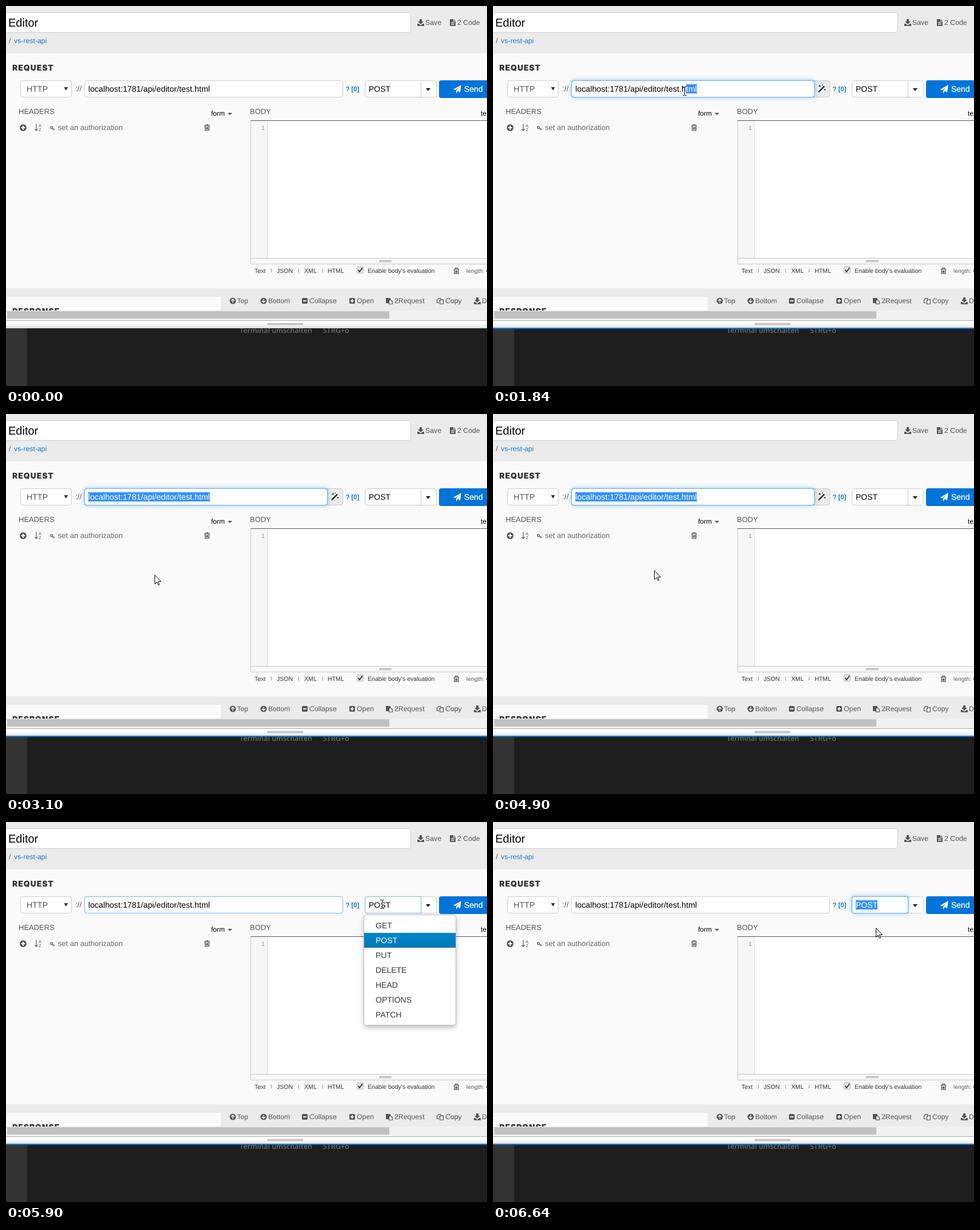
Write an HTML page that moves like this. It is 842x665 px and loops after 8 s.

```html
<!DOCTYPE html>
<html lang="en">
<head>
<meta charset="utf-8">
<title>REST editor</title>
<style>
  html, body { margin: 0; width: 100%; height: 100%; overflow: hidden; }
  svg { display: block; }
  text { font: 12.3px "Liberation Sans", Arial, sans-serif; fill: #555; text-rendering: geometricPrecision; white-space: pre; }
  .f13 { font-size: 13px; }
  .f14 { font-size: 14px; }
  .url { font-size: 14.3px; }
  .small { font-size: 10.6px; fill: #333; }
  .black { fill: #000; }
  .white { fill: #fff; }
  .link { fill: #1a79c9; }
  .title { font: 900 14px Inter, "Liberation Sans", sans-serif; letter-spacing: .9px; fill: #333; }
  .term { font: 600 12.5px "Open Sans", "Noto Sans", sans-serif; fill: #6c6c6c; }
  .field { fill: #fff; stroke: #ccc; }
  .ring { fill: none; stroke: #5cb3ee; }
  .glow { fill: #fff; stroke: #5cb3ee; filter: drop-shadow(0 0 3.5px rgba(82, 168, 236, .75)); }
  .sel { fill: #3390ff; }
  .icon { fill: #555; }
  .line { fill: none; stroke: #555; stroke-width: 1.2; }
  #menu .panel { fill: #fff; stroke: #bbb; filter: drop-shadow(0 4px 4px rgba(0, 0, 0, .25)); }
  #menu text { font-size: 14px; fill: #333; }
</style>
</head>
<body>
<svg width="842" height="665" viewBox="0 0 842 665">
  <defs>
    <g id="download"><path class="icon" d="M4 0h4v4h3L6 9 1 4h3zM0 8h2.5L6 11l3.500-3H12v4H0z"/></g>
    <g id="trash"><path class="line" d="M0 2.500H10M3 2V.6H7V2M1.500 3V10.400H8.500V3M3.500 4.500V9M5 4.500V9M6.500 4.500V9"/></g>
    <linearGradient id="active" x2="0" y2="1"><stop stop-color="#08c"/><stop offset="1" stop-color="#0077b3"/></linearGradient>
    <linearGradient id="bar" x2="0" y2="1"><stop offset=".4" stop-color="#fff"/><stop offset="1" stop-color="#ddd"/></linearGradient>
    <clipPath id="urlClip"><rect class="urlSel" y="137" height="16"/></clipPath>
    <clipPath id="respClip"><path d="M0 509H376V533H0z"/></clipPath>
  </defs>

  <!-- page -->
  <path fill="#fafafa" d="M0 0H842V550H0z"/>
  <path fill="#ebebeb" d="M0 0H842V83H0zM0 494H842V533H376V509H0z"/>
  <rect class="field" x="-5.500" y="11.500" width="714" height="35" rx="4"/>
  <text x="4" y="36" class="black" style="font-size:20px">Editor</text>
  <use href="#download" x="720" y="23"/>
  <text x="734" y="33">Save</text>
  <path class="icon" d="M777 23h6v4h4v8h-10zM784 23l3 3h-3z"/>
  <path stroke="#ebebeb" d="M779 28.500h6M779 30.500h6M779 32.500h6"/>
  <text x="790" y="33">2 Code</text>
  <text x="5" y="65">/</text>
  <text x="14" y="65" class="link">vs-rest-api</text>

  <!-- request line -->
  <text x="11" y="113" class="title">REQUEST</text>
  <rect class="field" x="25.500" y="130.500" width="89" height="29" rx="4"/>
  <text x="36" y="150" class="url">HTTP</text>
  <path fill="#333" d="M101.500 142h7l-3.500 6z"/>
  <text x="121.500" y="149" class="f13">://</text>
  <rect class="field" x="137.500" y="130.500" width="452" height="29" rx="4"/>
  <g id="wand">
    <path fill="#ebebeb" stroke="#ccc" d="M562.500 130.500h23a4 4 0 0 1 4 4v21a4 4 0 0 1-4 4h-23z"/>
    <path stroke="#222" stroke-width="2.400" d="M570 150.500l10-10"/>
    <path stroke="#222" d="M572 138v4M570 140h4M576.500 137v2M581 145v3M579.500 146.500h3"/>
  </g>
  <rect id="urlGlow" class="glow" x="137.500" y="130.500" height="29" rx="4"/>
  <rect id="urlRing" class="ring" x="137.500" y="130.500" height="29" rx="4"/>
  <text id="url" x="144" y="150" class="url black">localhost:1781/api/editor/test.html</text>
  <rect class="sel urlSel" y="137" height="16"/>
  <text x="144" y="150" class="url white" clip-path="url(#urlClip)">localhost:1781/api/editor/test.html</text>
  <text x="594.500" y="149" style="font-weight:bold;font-size:11.300px;fill:#0a74c0">? [0]</text>
  <rect class="field" x="628.500" y="130.500" width="125" height="29" rx="4"/>
  <path stroke="#ccc" d="M726.500 131V159"/>
  <path d="M735 144h8l-4 4.500z"/>
  <rect id="postGlow" class="glow" x="628.500" y="130.500" width="98" height="29" rx="3"/>
  <rect id="postRing" class="ring" x="628.500" y="130.500" width="98" height="29" rx="3"/>
  <rect id="postSel" class="sel" x="635" y="137" width="38" height="16"/>
  <text id="post" x="635" y="150" class="f14 black">POST</text>
  <rect x="758" y="130" width="94" height="31" rx="4" fill="#0074d9"/>
  <path class="white" fill="#fff" d="M797 138l-2 13-4.500-2-2.500 4v-5l6-7-7.500 6.500-3.500-1.500z"/>
  <text x="802" y="150" class="f14 white" stroke="#fff" stroke-width=".3">Send</text>

  <!-- headers -->
  <text x="22" y="189" class="f13">HEADERS</text>
  <text x="359" y="192" class="black" style="font-size:12px">form</text>
  <path class="icon" d="M388 187h8l-4 4z"/>
  <circle class="icon" cx="30" cy="213" r="6"/>
  <path stroke="#fafafa" stroke-width="2" d="M26.500 213h7M30 209.500v7"/>
  <path class="line" d="M53 206.500v11.500M50.500 215.500l2.500 2.500 2.500-2.500"/>
  <text x="57" y="212" style="font-size:7.500px">A</text>
  <text x="57" y="219" style="font-size:7.500px">Z</text>
  <circle class="line" cx="79.500" cy="212.500" r="1.900"/>
  <path class="line" d="M81 213.500l4.500 3.500M83 215l-1 1.500"/>
  <text x="91" y="217" class="f13" style="fill:#666">set an authorization</text>
  <use href="#trash" x="347" y="207"/>

  <!-- body -->
  <text x="427" y="189" class="f13">BODY</text>
  <text x="831" y="192" class="black" style="font-size:12px">text</text>
  <path fill="#fff" d="M458 201H842V441H458z"/>
  <path fill="#f7f7f7" d="M429 201H457V441H429z"/>
  <path stroke="#ddd" d="M457.500 201V441"/>
  <path stroke="#c4c4c4" fill="none" d="M842 451.500H428.500V200M429 441.500H842"/>
  <path stroke="#555" d="M428 200.500H842"/>
  <path stroke="#999" d="M653 445.500h22M653 447.500h22"/>
  <text x="447" y="217" style="font-size:11px;fill:#999">1</text>
  <text x="435" y="467" class="small">Text</text>
  <text x="474" y="467" class="small">JSON</text>
  <text x="522" y="467" class="small">XML</text>
  <text x="563" y="467" class="small">HTML</text>
  <path stroke="#5b9fc9" d="M464.500 459.500v7M512.500 459.500v7M553.500 459.500v7"/>
  <rect x="614.500" y="456.500" width="11" height="11" rx="1.500" fill="#f4f4f4" stroke="#aaa"/>
  <path d="M616.500 462l2.500 3 5-7" fill="none" stroke="#333" stroke-width="2"/>
  <text x="633" y="467" class="small">Enable body's evaluation</text>
  <use href="#trash" x="783.500" y="458"/>
  <text x="806" y="467" style="font-size:10px;letter-spacing:.2px">length: 0</text>

  <!-- response bar -->
  <text x="11" y="539" class="title" clip-path="url(#respClip)">RESPONSE</text>
  <circle class="icon" cx="397" cy="516" r="5.500"/>
  <path fill="none" stroke="#ebebeb" stroke-width="1.500" d="M394 516l3-3 3 3M397 513v6.500"/>
  <text x="404.500" y="520" style="font-size:12px">Top</text>
  <circle class="icon" cx="451" cy="516" r="5.500"/>
  <path fill="none" stroke="#ebebeb" stroke-width="1.500" d="M448 516l3 3 3-3M451 519v-6.500"/>
  <text x="459" y="520" style="font-size:12px">Bottom</text>
  <rect class="icon" x="518" y="511" width="10" height="10" rx="2"/>
  <path stroke="#ebebeb" stroke-width="2" d="M520 516h6"/>
  <text x="531" y="520">Collapse</text>
  <rect class="icon" x="601" y="511" width="10" height="10" rx="2"/>
  <path stroke="#ebebeb" stroke-width="2" d="M603 516h6M606 513v6"/>
  <text x="614" y="520">Open</text>
  <path class="icon" d="M665 511h8v3h-3v6h-5z"/>
  <path class="line" d="M670.500 514.500h3.500l2.500 2.500v4.500h-6z"/>
  <text x="680" y="520">2Request</text>
  <path class="line" d="M758 519.500h-3.500v-5l3-3h3.500v2.500M759.500 514.500h3l3-1v8h-6z"/>
  <text x="769" y="520">Copy</text>
  <use href="#download" x="819" y="510"/>
  <text x="833" y="520">Download</text>

  <!-- scrollbar, terminal, splitter -->
  <path fill="#f1f1f1" d="M0 533H842V550H0z"/>
  <path fill="#c1c1c1" d="M2 534H671V547H2z"/>
  <path fill="#1e1e1e" d="M0 564H842V665H0z"/>
  <path fill="#333" d="M0 564H37V665H0z"/>
  <text x="409" y="572" class="term">Terminal umschalten</text>
  <text x="555" y="572" class="term">STRG+o</text>
  <path fill="url(#bar)" d="M0 550H842V564H0z"/>
  <path stroke="#aaa" d="M0 550.500H842"/>
  <path fill="#fff" stroke="#999" d="M458.500 555.500h61v2h-61z"/>
  <path id="edge" stroke="#0e80d8" stroke-width="2" d="M0 564H842"/>

  <g id="menu">
    <rect class="panel" x="626.500" y="162.500" width="161" height="193" rx="5"/>
    <path fill="url(#active)" d="M627 194h160v26h-160z"/>
  </g>

  <path id="arrow" fill="#fff" stroke="#000" d="M.5.8V16.500l3.700-3.500 2.500 5.500 2-.9-2.400-5.200H11.300z"/>
  <g id="beam" fill="none">
    <path stroke="#fff" stroke-width="2.500" d="M0-6V6"/>
    <path stroke="#000" d="M-3.500-7.500H-1Q0-7.500 0-6.500Q0-7.500 1-7.500H3.500M0-6.500V6.500M-3.500 7.500H-1Q0 7.500 0 6.500Q0 7.500 1 7.500H3.500"/>
  </g>
</svg>
<script>
const LOOP = 8000, START = 499, TICK = 200 / 3;
const FOCUS = 18, DRAG_END = 28, RELEASE = 32, SWITCH = 80;
const URL_X = 144;
const $ = id => document.getElementById(id);
const clamp = v => Math.max(0, Math.min(1, v));

// pointer hotspot: tick, x, y
const path = [
  [0, 712, 184], [2, 520, 160], [5, 352, 147], [7, 352, 147],
  [8, 359, 148], [9, 365, 149], [10, 365, 149], [13, 374, 149],
  [18, 374, 149], [19, 366, 149], [26, 152, 148], [28, 123, 148],
  [31, 123, 148], [32, 200, 149], [35, 543, 168], [36, 440, 215],
  [37, 360, 250], [39, 260, 281], [65, 260, 281], [66, 282, 273],
  [70, 430, 222], [73, 670, 166], [75, 658, 143.5], [86, 658, 143.5],
  [87, 658, 150], [92, 670, 185]
];

["GET", "POST", "PUT", "DELETE", "HEAD", "OPTIONS", "PATCH"].forEach((name, i) => {
  const item = document.createElementNS("http://www.w3.org/2000/svg", "text");
  item.textContent = name;
  item.setAttribute("x", 647);
  item.setAttribute("y", 186 + 26 * i);
  if (name === "POST") item.style.fill = "#fff";
  $("menu").append(item);
});

function pointer(k) {
  const i = path.findIndex(p => p[0] > k);
  if (i < 0) return path[path.length - 1].slice(1);
  const [a, b] = [path[Math.max(0, i - 1)], path[i]];
  const f = clamp((k - a[0]) / (b[0] - a[0]));
  return [a[1] + (b[1] - a[1]) * f, a[2] + (b[2] - a[2]) * f];
}

// nearest gap between two letters of the address
function snap(x) {
  const text = $("url");
  let best = URL_X;
  for (let n = 1; n <= text.getNumberOfChars(); n++) {
    const edge = URL_X + text.getSubStringLength(0, n);
    if (Math.abs(edge - x) < Math.abs(best - x)) best = edge;
  }
  return best;
}

function show(id, on) { $(id).style.display = on ? "" : "none"; }

function focusRing(name, amount) {
  $(name + "Glow").style.opacity = amount * amount;
  $(name + "Ring").style.opacity = clamp(amount * 2);
}

function draw(k) {
  const [x, y] = pointer(k);
  const inField = y > 130 && y < 160 && (x > 137 && x < 590 || x > 628 && x < 727);
  const beam = inField || k >= FOCUS && k < RELEASE;
  show("beam", k >= 0 && beam);
  show("arrow", k >= 0 && !beam);
  $("beam").setAttribute("transform", `translate(${Math.round(x) + .5} ${Math.round(y)})`);
  $("arrow").setAttribute("transform", `translate(${Math.round(x)} ${Math.round(y)})`);

  const urlOn = k >= FOCUS && k < SWITCH;
  show("wand", urlOn);
  show("edge", k >= FOCUS);
  for (const id of ["urlGlow", "urlRing"]) $(id).setAttribute("width", urlOn ? 425 : 452);
  focusRing("url", k < SWITCH ? clamp((k - FOCUS + 1) / 3) : clamp((83 - k - 1) / 3));
  focusRing("post", clamp((k - SWITCH) / 3));

  const from = snap(pointer(Math.min(k, DRAG_END))[0]);
  document.querySelectorAll(".urlSel").forEach(r => {
    r.setAttribute("x", from);
    r.setAttribute("width", urlOn ? snap(900) - from : 0);
  });

  const picked = k >= 83;
  show("postSel", picked);
  $("post").style.fill = picked ? "#fff" : "";
  show("menu", k >= 81 && k < 84);
}

function frame() {
  draw(Math.floor((performance.now() % LOOP - START) / TICK));
  requestAnimationFrame(frame);
}
frame();
</script>
</body>
</html>
```
